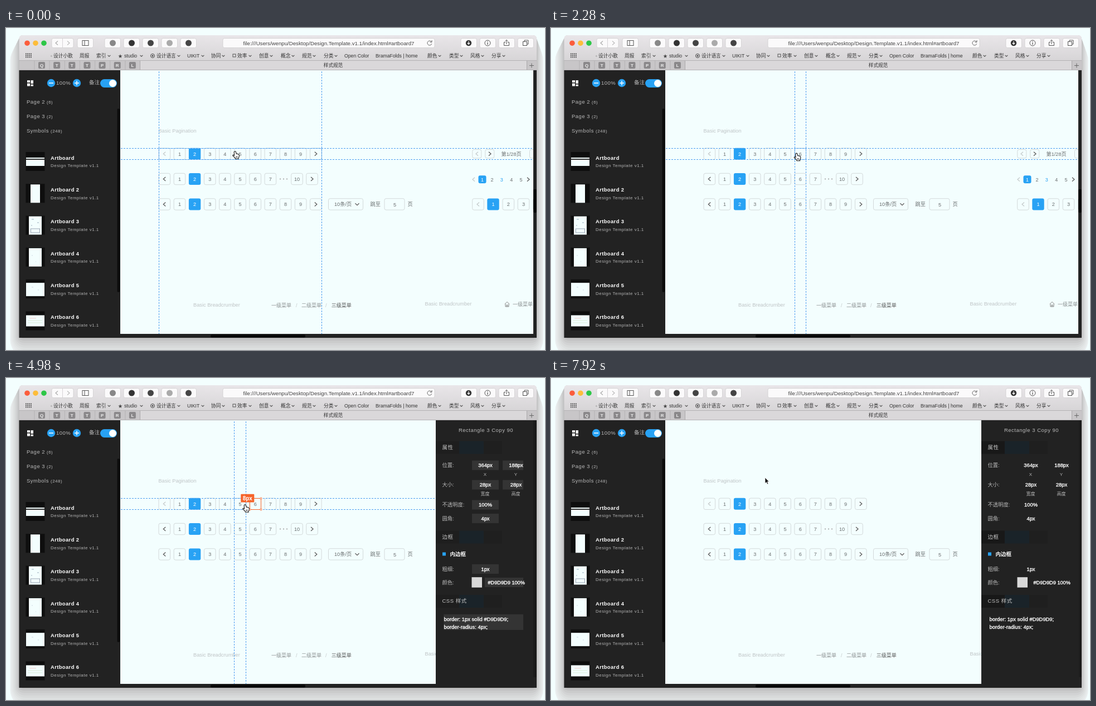
Write an HTML page that moves like this. It is 967x579 px and loops after 8 s.

```html
<!DOCTYPE html>
<html lang="zh">
<head>
<meta charset="utf-8">
<title>Design spec viewer</title>
<style>
  html, body { margin: 0; width: 100%; height: 100%; overflow: hidden; background: #f3fefe; }
  svg { display: block; width: 967px; height: 579px; }
  text { font-family: "Liberation Sans", "Noto Sans CJK SC", "Noto Sans CJK", sans-serif; white-space: pre; }
</style>
</head>
<body>
<svg id="stage" viewBox="0 0 967 579" xmlns="http://www.w3.org/2000/svg">
  <defs>
    <clipPath id="windowClip"><path d="M23.5 557V19q0-6 6-6H946q6 0 6 6V557z"/></clipPath>
    <clipPath id="canvasClip"><path d="M205 76H946V550H205z"/></clipPath>
    <linearGradient id="chrome" x2="0" y2="1"><stop stop-color="#e9e6e9"/><stop offset="1" stop-color="#d7d5d7"/></linearGradient>
  </defs>
  <g id="backdrop"></g>
  <g clip-path="url(#windowClip)">
    <g id="frame"></g>
    <g clip-path="url(#canvasClip)"><g id="page"></g><g id="guides"></g></g>
    <g id="panel"></g>
  </g>
  <g id="cursor"></g>
</svg>
<script>
const LOOP = 8000, BLUE = '#28a2f4', GUIDE = '#4a9cf0', ORANGE = '#f6642a', PAPER = '#f3fefe';
const byId = id => document.getElementById(id);

// Shape helpers; text is placed by its vertical centre.
const rect = (x, y, w, h, fill, r = 0, extra = '') =>
  `<rect x="${x}" y="${y}" width="${w}" height="${h}" fill="${fill}" rx="${r}" ${extra}/>`;
const outline = (x, y, w, h, color, r = 0) => rect(x, y, w, h, 'none', r, `stroke="${color}"`);
const circle = (x, y, r, fill, extra = '') => `<circle cx="${x}" cy="${y}" r="${r}" fill="${fill}" ${extra}/>`;
const line = (d, color, width = 1, extra = '') =>
  `<path d="${d}" fill="none" stroke="${color}" stroke-width="${width}" ${extra}/>`;
const text = (x, y, s, size, fill, extra = '') =>
  `<text x="${x}" y="${y + size * .36}" font-size="${size}" fill="${fill}" ${extra}>${s}</text>`;
const MID = 'text-anchor="middle"', BOLD = 'font-weight="bold"', WIDE = 'letter-spacing=".5"';
const centered = (x, y, s, size, fill, extra = '') => text(x, y, s, size, fill, MID + ' ' + extra);
const chevron = (x, y, dir, color = '#555') => line(`M${x - 2 * dir} ${y - 3.5}l${4 * dir} 3.5l${-4 * dir} 3.5`, color, 1.2);
const caret = (x, y, w = 2.4) => line(`M${x - w} ${y - w / 2}l${w} ${w}l${w} ${-w}`, '#555', 1.1);

// Stepped soft shadow, light at the rim and darker towards the window.
function drawBackdrop() {
  let s = rect(0, 0, 967, 579, PAPER);
  for (let k = 1; k >= 0; k -= .125) {
    const side = 16 * k, top = 13 + 14 * k, shade = 172 + 62 * Math.sqrt(k);
    s += rect(23.5 - side, top, 928.5 + 1.8 * side - k, 558 + 34 * k - top, `rgb(${shade},${shade + 4 * k},${shade + 5 * k})`, 7 + 24 * k);
  }
  return s;
}

function drawToolbar() {
  const ink = '#555', row = 50;
  const button = (x, w) => rect(x, 18.5, w, 17, '#fbfafb', 3, 'stroke="#cfcdcf" stroke-width=".8"');
  let s = rect(23, 13, 929, 45, 'url(#chrome)');
  ['#fb5d3c', '#fdbd3a', '#2ec748'].forEach((c, i) => s += circle(38 + i * 15, 27.2, 4.8, c));
  s += button(82, 39) + line('M101.5 19v16', '#d5d3d5') + chevron(91, 27, -1, '#aaa') + chevron(112, 27, 1, '#bbb');
  [128, 177, 211, 245, 279, 313, 816, 850, 884, 918].forEach(x => s += button(x, 28.5));
  s += outline(137, 22.5, 11, 9, ink) + line('M141 22.5v9', ink);
  ['#888', '#333', '#444', '#aaa', '#444'].forEach((c, i) => s += circle(191.5 + i * 34, 27, 5.5, c));
  s += button(389, 380) + centered(579, 27.3, 'file:///Users/wenpu/Desktop/Design.Template.v1.1/index.html#artboard7', 9.68, '#444');
  s += line('M763.5 25.2a4 4 0 1 0 .3 3M764 22v3.4h-3.4', '#666');
  s += circle(830, 27, 5.2, '#333') + line('M830 23.8v5M827.8 27l2.2 2.4l2.2-2.4', '#fff', 1.2);
  s += circle(864, 27, 5, 'none', `stroke="${ink}"`) + line('M864 26v4M864 23.8v1.1', ink, 1.2);
  s += line('M896 25.5h-2.5v6h9v-6h-2.5M898 29v-7.5M895.8 23.5l2.2-2.2l2.2 2.2', ink);
  s += outline(927.5, 24.5, 7, 7, ink) + line('M930 24v-2h7v7h-2', ink);

  for (let i = 0; i < 12; i++) s += rect(35 + i % 4 * 3, 45.5 + (i >> 2) * 3, 1.8, 1.8, '#444');
  s += text(80, row, '◦', 8, '#444') + text(201, row, '★', 8, '#444') +
    circle(263, row, 3.5, 'none', 'stroke="#444"') + circle(263, row, 1.5, '#444') + outline(407, 47, 5, 5, ink);
  [[85, '设计小歌'], [132, '周报'], [162, '索引', 185], [212, 'studio', 243], [270, '设计语言', 310], [325, 'UIKIT', 353],
   [368, '协同', 390], [415, '效率', 438], [454, '创意', 476], [493, '概念', 515], [531, '规范', 553], [570, '分类', 592],
   [607, 'Open Color'], [663, 'BramaFolds | home'], [756, '颜色', 778], [795, '类型', 817], [833, '风格', 855], [871, '分享', 893]]
    .forEach(([x, label, menu]) => s += text(x, row, label, 8.7, '#333') + (menu ? caret(menu, row) : ''));

  s += rect(23, 58, 929, 18, '#c8c6c8') + rect(241, 58.5, 693, 17.5, '#dad8da') + line('M23 58.5H952M23 75.5H952', '#b4b2b4');
  [...'QTTTPRL'].forEach((letter, i) => {
    const x = 64 + i * 27.15;
    s += line(`M${x - 13} 59v16`, '#b4b2b4') + rect(x - 6, 61, 12, 12, '#8a888a', 2) + centered(x, 67, letter, 8, '#eee', BOLD);
  });
  return s + line('M240.5 59v16M934.5 59v16', '#aaa8aa') + centered(587, 67.3, '样式规范', 8.6, '#333') +
    line('M939 67.5h8M943 63.5v8', '#666');
}

function drawSidebar() {
  const dim = '#b8b8b8';
  let s = rect(23, 76, 929, 481, '#222') + rect(199.5, 145, 4.5, 330, '#0c0c0c', 2);
  s += rect(38, 94, 5, 4, '#fff') + rect(44.5, 94, 4.5, 6, '#fff') + rect(38, 99.5, 5, 5, '#fff') + rect(44.5, 101.5, 4.5, 3, '#fff');
  s += circle(81, 99, 7.2, BLUE) + circle(127, 99, 7.2, BLUE) + line('M77 99h8M123 99h8M127 95v8', '#fff', 1.4);
  s += text(90, 98.5, '100%', 9.5, dim, WIDE) + text(149, 97.5, '备注', 9.5, dim);
  s += rect(169, 92, 30, 15, BLUE, 7.5) + circle(191.5, 99.5, 6.5, '#fff');
  [['Page 2', 6, 73], ['Page 3', 2, 73], ['Symbols', 248, 80]].forEach(([name, count, x], i) => {
    const y = 132.3 + i * 26;
    s += text(37, y, name, 9.5, dim, WIDE) + text(x, y + .5, `(${count})`, 8, dim, WIDE);
  });
  // Thumbnail paper: x, y offset, width, height
  [[36, 10, 33, 15], [44, 1, 17, 33], [41, 1, 23, 33], [41, 1, 23, 33], [36, 6, 33, 24], [36, 7, 33, 20]].forEach(([x, dy, w, h], i) => {
    const y = 233.3 + i * 57.3, top = y - 10.3;
    s += rect(35.5, top, 34, 34, '#0e0e0e') + rect(x, top + dy, w, h, PAPER);
    s += text(80, y, 'Artboard' + (i ? ' ' + (i + 1) : ''), 9.4, '#fff', `${BOLD} letter-spacing=".4"`) +
      text(80, y + 14.3, 'Design Template v1.1', 8, '#b4b4b4', WIDE);
  });
  s += rect(36, 235, 33, 2, '#333') + outline(44.5, 361, 16, 7, '#9aa5b5') + line('M46 344h4M56 350h3M45 355h2', '#9ab') +
    line('M46 409h2M53 420h1M46 466h3M57 471h2', '#cdd8e4') + line('M39 526h26M39 530h26', '#d9ead5') + line('M42 522h12', '#f3ccc8');
  return s + rect(205, 76, 741, 474, PAPER) + rect(946, 290, 6, 42, '#080808', 2) + rect(367, 551.5, 170, 5, '#080808', 2);
}

function drawPage() {
  const step = 27.15, ink = '#6b6f70', edge = '#d3d9da', pale = '#c3c9ca', label = '#bfc4c6';
  const key = (cx, cy, s, active) => (active ? rect(cx - 10.7, cy - 10.5, 21.4, 21, BLUE, 3) : outline(cx - 10.3, cy - 10.2, 20.6, 20.4, edge, 3)) +
    (s === '<' || s === '>' ? chevron(cx, cy, s === '>' ? 1 : -1) :
     s === 'off' ? chevron(cx, cy, -1, pale) : centered(cx, cy, s, 9.2, active ? '#fff' : ink));
  const keys = (x, y, labels) => labels.map((s, i) => key(x + i * step, y, s, s === '2')).join('');
  let s = text(273.5, 184.5, 'Basic Pagination', 9.15, label);
  s += keys(284.3, 226.3, ['off', ...'123456789', '>']) + keys(284.3, 271.5, ['<', ...'1234567']) +
    keys(284.3, 317, ['<', ...'123456789', '>']);
  [492, 498, 504].forEach(x => s += circle(x, 271.5, 1, '#999'));
  s += key(522, 271.5, '10') + key(549, 271.5, '>');
  s += outline(578.5, 306.7, 62, 20.4, edge, 3) + text(589, 317, '10条/页', 9.2, ink) + caret(630, 317, 3.5) +
    text(653.5, 317, '跳至', 9.2, ink) + outline(679, 306.7, 36, 20.4, edge, 3) + centered(697.5, 317.5, '5', 9.2, ink) + text(720.5, 317, '页', 9.2, ink);

  s += outline(836.8, 218.5, 16, 15.5, edge, 3) + chevron(845, 226.3, -1, pale) + outline(859.8, 218.5, 16, 15.5, edge, 3) + chevron(868, 226.3, 1) +
    text(888.5, 226.3, '第1/28页', 9.2, ink) + outline(939.5, 218.5, 20, 15.5, edge, 3);
  s += chevron(839, 272.3, -1, pale) + rect(847.5, 265.3, 14, 14, BLUE, 3) + chevron(937, 272.3, 1);
  [...'12345'].forEach((n, i) => s += centered(854.5 + i * 17.4, 272.5, n, 9, ['#fff', ink, BLUE][i] || ink));
  s += key(847, 317, 'off') + key(874, 317, '1', true) + key(901.3, 317, '2') + key(928.5, 317, '3') + key(955.6, 317, '4');

  s += text(336, 497.5, 'Basic Breadcrumber', 9.25, label) + text(751.5, 496, 'Basic Breadcrumber', 9.25, label);
  s += text(476, 498.5, '一级菜单', 9, '#8d9192') + text(520, 498.5, '/', 9, pale) + text(530, 498.5, '二级菜单', 9, '#8d9192') +
    text(573, 498.5, '/', 9, pale) + text(583.7, 498.5, '三级菜单', 9, '#555');
  return s + line('M894.8 496.5l4.2-4l4.2 4M896 496v5h6v-5M898 501v-3h2v3', '#888') + text(909, 497, '一级菜单', 9, '#8d9192');
}

// Guides and selection; boxes are [left, right] on the first pagination row.
const GROUP = [274.5, 566.5], FIVE = [409.5, 430.5], SIX = [437.5, 457.5], TOP = 216.5, BOTTOM = 236.5;
const tag = (cx, cy, s) => {
  const w = s.length > 3 ? 29 : 24;
  return rect(cx - w / 2, cy - 7.4, w, 14.8, ORANGE, 1) + centered(cx, cy, s, 10, '#fff', BOLD);
};
function drawGuides({ hover, selected, tags = [] }) {
  let s = '';
  if (hover) {
    const [l, r] = hover;
    s += outline(l, TOP, r - l, BOTTOM - TOP, '#8fc3f3') +
      line(`M${l} 78V550M${r} 78V550M206 ${TOP}H946M206 ${BOTTOM}H946`, GUIDE, 1, 'stroke-dasharray="3 2"');
  }
  if (selected === 'label') s += outline(444.5, 221.5, 5, 13, ORANGE);
  if (selected === 'box') {
    s += outline(SIX[0], TOP, SIX[1] - SIX[0], BOTTOM - TOP, ORANGE);
    for (const x of SIX) for (const y of [TOP, BOTTOM]) s += circle(x, y, 1.5, '#fff', `stroke="${ORANGE}"`);
  }
  return s + tags.map(t => tag(...t)).join('');
}

function drawPanel({ kind, fields }) {
  const dim = '#b8b8b8', white = '#fff';
  const header = (y, s) => rect(771, y - 11, 42, 23, fields ? '#1e1e1e' : '#181818') + rect(813, y - 11, 44, 23, '#1a2329') +
    rect(857, y - 11, 33, 23, '#1f1f1f') + text(782.5, y, s, 9.5, '#c4c4c4', WIDE);
  const name = (y, s) => text(782.5, y, s, 9.3, dim);
  const [c1, c2] = kind === 'label' ? [858.5, 910.5] : [860, 915];
  const field = (x, y, w = 48, h = 17) => fields ? rect(x, y - 8.5, w, h, '#343434') : '';
  const strong = 'stroke="#fff" stroke-width=".35"';
  const value = (x, y, s) => field(x === c1 ? 836 : 891, y, x === c1 ? 48 : 37) + centered(x, y, s, 9.4, white, strong);
  const plain = (x, y, s, size = 9.2) => text(x, y, s, size, white, strong);
  const rules = (y, list) => list.map((s, i) => plain(785.5, y + i * 13.7, s, 9.4)).join('');
  const note = (x, y, s) => centered(x, y, s, 8, dim);
  const pair = (y, label, a, b, na, nb) => name(y, label) + value(c1, y, a) + value(c2, y, b) + note(c1 - .5, y + 16, na) + note(c2 - .5, y + 16, nb);
  const swatch = (y, color) => rect(835.5, y - 9.3, 18.5, 18.5, color);

  let s = rect(771, 76, 181, 481, '#222') + rect(946, 76, 6, 462, '#1b1b1b') + header(124.5, '属性');
  s += centered(kind === 'label' ? 858 : 861, 94, kind === 'label' ? '6 copy 3' : 'Rectangle 3 Copy 90', 9.5, dim, WIDE);
  s += name(228, '不透明度:') + value(c1, 228, '100%');
  if (kind === 'label') {
    s += pair(157, '位置:', '374px', '195px', 'X', 'Y') + pair(192, '大小:', '7px', '18px', '宽度', '高度');
    s += header(261.5, '字体') + name(294.5, '字体:') + plain(855, 294.5, 'HelveticaNeue') +
      name(318.5, '颜色:') + swatch(318.5, '#737377') + plain(864, 318.5, '#666666 100%') +
      name(343, '大小:') + value(c1, 343, '12px') + pair(367, '空间:', '0px', '18px', '字间距', '行高') +
      plain(785.5, 403, '6') + note(c1, 435, '内容') + header(464, 'CSS 样式') +
      rules(497, ['font-family: HelveticaNeue;', 'font-size: 12px;', 'color: #666666;', 'line-height: 18px;']);
  } else {
    s += pair(157, '位置:', '364px', '188px', 'X', 'Y') + pair(192, '大小:', '28px', '28px', '宽度', '高度');
    s += name(252.5, '圆角:') + value(c1, 252.5, '4px') + header(285.5, '边框') +
      rect(783, 313.5, 6, 6, BLUE) + text(796.5, 316.5, '内边框', 9.5, white, BOLD) +
      name(343.5, '粗细:') + value(c1, 343.5, '1px') + name(367.5, '颜色:') + swatch(367.5, '#d9d9d9') +
      field(859, 367.5, 69) + plain(864.5, 367.5, '#D9D9D9 100%') + header(401, 'CSS 样式') + field(785.5, 433.5, 142.5, 28) +
      rules(434, ['border: 1px solid #D9D9D9;', 'border-radius: 4px;']);
  }
  return s;
}

const HAND = '<path d="M4 1q1.8-1 2.4 1l.8 3.2 1-.2 1 .5 1.2 0 .8.8q1.2.4 1.2 2L12 11l-1 1.2.1 2H5.5L4.7 12 1 8.8q-.6-1.2.6-1.6l2 1L3.2 2z" fill="#fff" stroke="#111" stroke-width="1.1"/><path d="M7 9.5v3M8.7 9.5v3" stroke="#111" stroke-width=".8"/>';
const ARROW = '<path d="M0 0V10.5L2.4 8.3L4 12L5.8 11.2L4.2 7.6H7.2z" fill="#111" stroke="#fff" stroke-width=".7"/>';

// Each scene holds until the next; shift is how far the panel is slid out to the right.
const size = { selected: 'box', tags: [[447, 206.2, '28px'], [473.5, 226.4, '28px']] };
const labelSize = { selected: 'label', tags: [[447, 211.7, '7px'], [465.5, 227.5, '18px']], kind: 'label' };
const open = { kind: 'box', shift: 0, fields: true };
const SCENES = [
  { at: 0, hover: GROUP },
  { at: 90, hover: FIVE },
  { at: 430, hover: SIX },
  { at: 700, ...labelSize },
  { at: 1260, ...labelSize, shift: 50 },
  { at: 1410, hover: SIX, selected: 'label', kind: 'label', shift: 0,
    tags: [[460, 218, '7px'], [461, 236, '3px'], [441, 217.7, '10px']] },
  { at: 2160, hover: SIX, kind: 'label', shift: 1 },
  { at: 2280, hover: SIX },
  { at: 2670, hover: GROUP },
  { at: 3110, hover: SIX },
  { at: 3560, ...size, kind: 'box', shift: 80 },
  { at: 3640, ...size, kind: 'box', shift: 1 },
  { at: 3790, ...size, ...open },
  { at: 4050, hover: FIVE, selected: 'box', tags: [[433.3, 216.2, '8px']], ...open },
  { at: 5060, hover: GROUP, selected: 'box', ...open },
  { at: 5240, ...size, ...open },
  { at: 7060, hover: GROUP, selected: 'box', ...open },
  { at: 7230, ...size, ...open, arrow: true },
  { at: 7920, kind: 'box', shift: 1, arrow: true },
];
// Cursor path: time, x, y
const PATH = [[0, 406, 221], [90, 407, 222], [260, 414, 222], [520, 440, 222], [1260, 440, 222], [1710, 435.5, 224.5],
  [2670, 435.5, 224.5], [2850, 429, 226], [3110, 434, 225], [3200, 437, 224], [4050, 437, 224], [4350, 420, 227], [4900, 420, 227],
  [4980, 424, 227], [5060, 424, 227], [5780, 456, 226], [6350, 458, 227], [6620, 461, 227], [6700, 466, 227], [6800, 466, 227],
  [6880, 466, 230], [6960, 466, 230], [7650, 383, 180], [7740, 384, 179], [LOOP, 384, 179]];

function cursorAt(t) {
  const i = PATH.findIndex(p => p[0] > t), [t0, x0, y0] = PATH[i - 1], [t1, x1, y1] = PATH[i];
  const k = (t - t0) / (t1 - t0);
  return [x0 + (x1 - x0) * k, y0 + (y1 - y0) * k];
}

byId('backdrop').innerHTML = drawBackdrop();
byId('frame').innerHTML = drawToolbar() + drawSidebar();
byId('page').innerHTML = drawPage();

let shown;
function render(now) {
  const t = now % LOOP, scene = SCENES.findLast(s => s.at <= t);
  if (scene !== shown) {
    shown = scene;
    byId('guides').innerHTML = drawGuides(scene);
    byId('panel').innerHTML = scene.shift === undefined ? '' : drawPanel(scene);
    byId('panel').setAttribute('transform', `translate(${scene.shift || 0})`);
    byId('cursor').innerHTML = scene.arrow ? ARROW : HAND;
  }
  byId('cursor').setAttribute('transform', `translate(${cursorAt(t)})`);
}
const start = performance.now();
(function tick() {
  render(Math.max(0, performance.now() - start));
  requestAnimationFrame(tick);
})();
</script>
</body>
</html>
```
